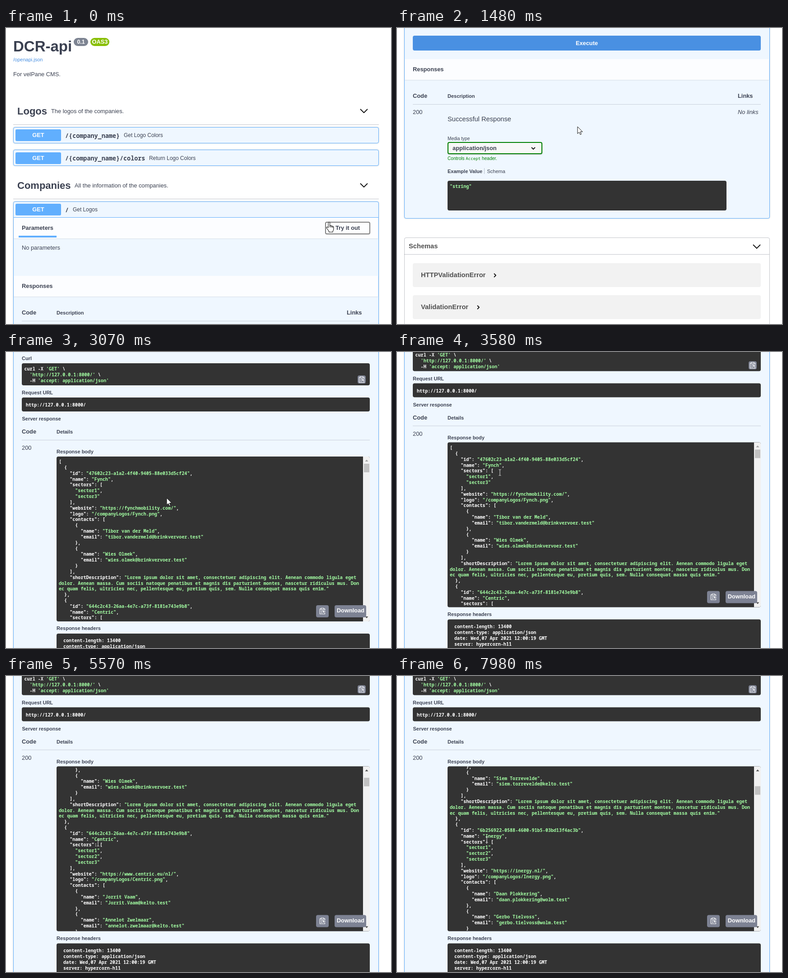
Animation of 853 by 657 pixels, one loop 8000 ms. Source, as an HTML page:

```html
<!DOCTYPE html>
<html lang="en">
<head>
<meta charset="utf-8">
<title>API docs demo</title>
<style>
  html, body { margin: 0; width: 100%; height: 100%; overflow: hidden; background: #fff; }
  #stage { position: relative; width: 853px; height: 657px; overflow: hidden; color: #3b4151;
    font-family: "Liberation Sans", Arial, sans-serif; }
  #stage div, #stage svg { position: absolute; box-sizing: border-box; }
  svg { overflow: visible; }
  .text { white-space: pre; line-height: 20px; margin-top: -10px; }
  .bold { font-weight: 700; }
  .mid { transform: translateX(-50%); }
  .white { color: #fff; }
  .green { color: #008000; }
  .code { white-space: pre-wrap; word-break: break-all; line-height: 12.83px; margin-top: -6.4px;
    width: 110.5ch; color: #fff; font: 700 10.08px/12.83px "Noto Sans Mono", "DejaVu Sans Mono", monospace; }
  .code i { font-style: normal; color: #a2fca2; }
  .mono { font-family: "Noto Sans Mono", "DejaVu Sans Mono", monospace; }
  .block { background: #eff7ff; border: 1px solid #61affe; border-radius: 4px; box-shadow: 0 0 3px rgba(0,0,0,.19); }
  .head { background: rgba(255,255,255,.8); box-shadow: 0 1px 2px rgba(0,0,0,.1); }
  .get { background: #61affe; border-radius: 3px; }
  .rule { background: rgba(59,65,81,.3); }
  .dark { background: #333; border-radius: 4px; overflow: hidden; }
  .btn { border: 2px solid #808080; border-radius: 4px; background: rgba(255,255,255,.35); box-shadow: 0 1px 2px rgba(0,0,0,.1); }
  .exec { background: #4990e2; border-radius: 4px; }
  .grey { background: #7d8293; border-radius: 4px; }
  .panel { background: #f2f2f2; border-radius: 4px; }
</style>
</head>
<body>
<div id="stage"></div>
<script>
const stage = document.getElementById('stage');

function box(parent, x, y, w, h, cls = '', css = '') {
  const el = document.createElement('div');
  el.className = cls;
  el.style.cssText = `left:${x}px;top:${y}px;width:${w}px;height:${h}px;${css}`;
  return parent.appendChild(el);
}
function text(parent, x, y, html, size = 12.83, cls = '', css = '') {
  const el = document.createElement('div');
  el.className = 'text ' + cls;
  el.style.cssText = `left:${x}px;top:${y}px;font-size:${size}px;${css}`;
  el.innerHTML = html;
  return parent.appendChild(el);
}
function code(parent, x, y, html) {
  const el = document.createElement('div');
  el.className = 'code';
  el.style.cssText = `left:${x}px;top:${y}px`;
  el.innerHTML = html;
  return parent.appendChild(el);
}
function path(parent, x, y, d, stroke = '#111', fill = 'none', width = 1.8) {
  parent.insertAdjacentHTML('beforeend',
    `<svg width="1" height="1" style="left:${x}px;top:${y}px"><path d="${d}" fill="${fill}" stroke="${stroke}" stroke-width="${width}" stroke-linejoin="round"/></svg>`);
  return parent.lastElementChild;
}
const layer = (parent, y = 0) => box(parent, 0, y, 853, 0);
const chevron = (parent, x, y) => path(parent, x, y, 'M-8-4L0 4L8-4');
const caret = (parent, x, y) => path(parent, x, y, 'M-2-4L2 0L-2 4');

function clipboard(parent, x, y, w, h) {
  box(parent, x, y, w, h, 'grey');
  path(parent, x + w / 2, y + h / 2,
    'M-3-5H-5.5V6.5H5.5V4M5.5-1V-5H3M-3-6.5H3V-3.5H-3ZM-3-1H3M-3 1.5H0M-3 4H0M7 1.5H1.5M4-.8L1.5 1.5L4 3.8', '#fff', 'none', 1.2);
}
function operation(parent, y, route, labelX, label) {
  box(parent, 21, y + 5, 101, 26, 'get');
  text(parent, 71.5, y + 18, 'GET', 12.83, 'bold white mid');
  text(parent, 131, y + 18.5, route, 13.45, 'mono bold');
  text(parent, labelX, y + 18, label, 11.92);
}
function section(parent, y, label) {
  box(parent, 17, y, 807, 46, 'head');
  text(parent, 35, y + 22.5, label, 12.83, 'bold');
}
function tag(parent, y, name, noteX, note) {
  text(parent, 25, y, name, 22, 'bold');
  text(parent, noteX, y + .5, note);
  chevron(parent, 792.5, y - .5);
  box(parent, 16, y + 29.5, 810, 1, 'rule');
}

// Top of the page
const page = layer(stage);
text(page, 16, 41, 'DCR-api', 33, 'bold');
box(page, 150, 22, 32, 18, '', 'background:#7d8492;border-radius:9px');
text(page, 166, 31, '0.1', 12.4, 'bold white mid');
box(page, 187, 22, 42, 18, '', 'background:#89bf04;border-radius:9px');
text(page, 208, 31, 'OAS3', 12.83, 'bold white mid');
text(page, 16, 69.5, '/openapi.json', 11, '', 'color:#4990e2');
text(page, 16, 102.5, 'For velPane CMS.');
tag(page, 184.5, 'Logos', 100, 'The logos of the companies.');
box(page, 15.5, 220, 810, 36, 'block');
operation(page, 220, '/{company_name}', 261, 'Get Logo Colors');
box(page, 15.5, 270, 810, 36, 'block');
operation(page, 270.5, '/{company_name}/colors', 317, 'Return Logo Colors');
tag(page, 349.5, 'Companies', 152, 'All the information of the companies.');

const openBlock = box(page, 15.5, 384.5, 810, 519, 'block');
operation(page, 385, '/', 148, 'Get Logos');
box(page, 16, 420, 809, 1, '', 'background:#61affe');
section(page, 421, 'Parameters');
box(page, 28, 461, 84, 4, '', 'background:#61affe');
text(page, 35, 488, 'No parameters');
const tryOut = layer(page);
box(tryOut, 706.5, 430, 100, 28, 'btn');
text(tryOut, 757, 444, 'Try it out', 12.83, 'bold mid');
const cancel = layer(page);
box(cancel, 715, 430, 91, 28, 'btn', 'border-color:#ff6060');
text(cancel, 760.5, 444, 'Cancel', 12.83, 'bold mid', 'color:#ff6060');

// Documented responses and schemas
const docs = layer(page);
const execute = layer(docs);
box(execute, 35, 17, 771, 33, 'exec');
text(execute, 420.5, 34, 'Execute', 12.83, 'bold white mid');
section(docs, 69, 'Responses');
text(docs, 35, 151, 'Code', 12.83, 'bold');
text(docs, 112, 151, 'Description', 11, 'bold');
text(docs, 755, 151, 'Links', 12.83, 'bold');
box(docs, 35, 169, 771, 1, 'rule', 'opacity:.7');
text(docs, 35, 187, '200');
text(docs, 755, 187, '<em>No links</em>');
text(docs, 112, 201.5, 'Successful Response', 14.67);
text(docs, 112, 245.5, 'Media type', 10.08);
box(docs, 111.5, 253, 210.5, 27, '', 'background:#f7f7f7;border:2px solid #008000;border-radius:4px;box-shadow:0 1px 2px rgba(0,0,0,.25)');
text(docs, 123, 266.5, 'application/json', 12.83, 'bold');
path(docs, 302, 266.5, 'M-4-2L0 2L4-2');
text(docs, 112, 289.5, 'Controls <span class="mono" style="font-size:9.17px">Accept</span> header.', 10.08, 'green');
text(docs, 112, 317.5, 'Example Value', 11, 'bold');
box(docs, 193, 311, 1, 13, 'rule');
text(docs, 199.5, 317.5, 'Schema', 11);
box(docs, 111.5, 338.5, 618, 66, 'dark');
code(docs, 117, 351, '<i>"string"</i>');
box(docs, 15.5, 465, 810, 200, '', 'border:1px solid rgba(59,65,81,.3);border-radius:4px');
box(docs, 16, 502, 809, 1, 'rule');
text(docs, 26, 484, 'Schemas', 14.67, 'bold', 'color:#505050');
chevron(docs, 797, 484.5);
[['HTTPValidationError', 522, 217], ['ValidationError', 593, 179.5]].forEach(([name, y, x]) => {
  box(docs, 35, y, 771, 53, 'panel');
  text(docs, 53, y + 26, name, 14.67, 'bold', 'color:#505050');
  caret(docs, x, y + 27);
});

// Live response
const live = layer(page, 550);
box(live, 44, 24, 291, 30, 'exec', 'border-radius:4px 0 0 4px');
text(live, 189, 39, 'Execute', 12.83, 'bold white mid');
box(live, 334, 24, 463, 30, 'btn', 'border-radius:0 4px 4px 0');
text(live, 565.5, 39, 'Clear', 12.83, 'bold mid');
section(live, 81.5, 'Responses');
text(live, 35, 160.5, 'Curl', 11, 'bold');
box(live, 35, 172, 771, 49, 'dark');
code(live, 40.5, 184.5, `curl -X <i>'GET'</i> \\
  <i>'http://127.0.0.1:8000/'</i> \\
  -H <i>'accept: application/json'</i>`);
clipboard(live, 779, 198.5, 18, 18.5);
text(live, 35, 237, 'Request URL', 11, 'bold');
box(live, 35, 248, 771, 31, 'dark');
code(live, 44, 264, 'http://127.0.0.1:8000/');
text(live, 35.5, 294.5, 'Server response', 11, 'bold');
text(live, 35, 324, 'Code', 12.83, 'bold');
text(live, 112, 324, 'Details', 11, 'bold');
box(live, 35, 342, 771, 1, 'rule', 'opacity:.7');
text(live, 35, 360, '200');
text(live, 112, 367.5, 'Response body', 11, 'bold');

const lorem = 'Lorem ipsum dolor sit amet, consectetuer adipiscing elit. Aenean commodo ligula eget dolor. ' +
  'Aenean massa. Cum sociis natoque penatibus et magnis dis parturient montes, nascetur ridiculus mus. ' +
  'Donec quam felis, ultricies nec, pellentesque eu, pretium quis, sem. Nulla consequat massa quis enim.';
const company = (id, name, sectors, website, mail, people) => ({
  id, name,
  sectors: sectors.map(n => 'sector' + n),
  website,
  logo: `/companyLogos/${name}.png`,
  contacts: people.map(([name, user]) => ({ name, email: `${user}@${mail}` })),
  shortDescription: lorem
});
const companies = [
  company('47602c23-a1a2-4f40-9405-88e033d5cf24', 'Fynch', [1, 3], 'https://fynchmobility.com/', 'brinkvervoer.test',
    [['Tibor van der Meld', 'tibor.vandermeld'], ['Wies Olmek', 'wies.olmek']]),
  company('644c2c43-26aa-4e7c-a73f-8181e743e9b8', 'Centric', [1, 2, 3], 'https://www.centric.eu/nl/', 'kelto.test',
    [['Jorrit Vaam', 'Jorrit.Vaam'], ['Annelot Zwelmaar', 'annelot.zwelmaar'], ['Siem Torrevelde', 'siem.torrevelde']]),
  company('6b256922-0588-4600-91b5-03bd13f4ac3b', 'Inergy', [1, 2, 3], 'https://inergy.nl/', 'wolm.test',
    [['Daan Plokkering', 'daan.plokkering'], ['Gerbo Tielvoss', 'gerbo.tielvoss']])
];
const json = JSON.stringify(companies, null, 2)
  .replace(/("[^"]*")(:?)/g, (all, str, colon) => colon ? all : `<i>${str}</i>`);

const body = box(live, 111.5, 379, 694.5, 366, 'dark');
const list = box(body, 5.5, 11.5, 680, 0);
code(list, 0, 0, json);
const selection = box(list, 78.65, 32, 0, 13, '', 'background:#0a64d2;overflow:hidden');
code(selection, 0, 6.5, 'Fynch');
box(body, 679.5, 0, 15, 366, '', 'background:#f1f1f1');
const thumb = box(body, 681.5, 15.5, 12, 19, '', 'background:#c1c1c1');
const upArrow = path(body, 687, 8.5, 'M-3.5 2L0-2L3.5 2Z', 'none', '#505050');
path(body, 687, 357, 'M-3.5-2L0 2L3.5-2Z', 'none', '#505050');
clipboard(live, 687, 708.5, 28, 27);
box(live, 728, 708.5, 70, 27, 'grey');
text(live, 763.5, 721, 'Download', 12.83, 'bold white mid');
text(live, 112, 760, 'Response headers', 11, 'bold');
box(live, 111.5, 772, 694.5, 80, 'dark');
code(live, 127, 787.5, `content-length: 13400
content-type: application/json
date: Wed,07 Apr 2021 12:00:19 GMT
server: hypercorn-h11`);

// Pointers, each drawn from its hot spot
const pointers = {
  hand: path(stage, 0, 0, 'M-2 12V1.5a1.8 1.8 0 0 1 3.6 0V8q2.2-1 3 .6q2.2-.8 3 .8q2.2-.2 2.2 2V15q0 3-1.8 5v2H-.5v-2L-5.4 13.5q-1.2-2 .4-2.7Q-3.6 10.3-2 12zM1.6 8v3.5M4.6 9v3M7.6 10v2.5', '#111', '#fff', 1.1),
  arrow: path(stage, 0, 0, 'M0 0V15.5L3.6 12.2L6 17.6L8.4 16.6L6.1 11.3H11Z', '#111', '#fff', 1),
  beam: path(stage, 0, 0, 'M-2.5-6.5H-.8L0-6L.8-6.5H2.5M0-6V6M-2.5 6.5H-.8L0 6L.8 6.5H2.5', '#e8e8e8', 'none', 1)
};

// Timelines: [time, value] with straight lines between
const scrollKeys = [[920, 0], [1400, 550], [2700, 550], [3035, 697], [3290, 728.5]];
const listKeys = [[5120, 0], [5400, 183.3], [6150, 183.3], [6500, 366.6], [7300, 366.6], [7650, 550]];
const selectKeys = [[3860, 0], [4480, 5]];
const xKeys = [[0, 716], [390, 745], [700, 745], [1300, 400], [1590, 400], [1840, 420], [2250, 420], [2650, 356],
  [3080, 356], [3690, 195], [3860, 195], [4480, 228], [4800, 228], [5200, 205], [5540, 204], [5960, 204], [7930, 199]];
const yKeys = [[0, 431], [390, 450], [700, 450], [1300, 219], [1590, 219], [1840, 34], [2250, 34], [2650, 324],
  [3080, 324], [3690, 253], [4800, 253], [5200, 366], [5540, 371], [5960, 371], [7930, 363]];

function at(keys, t) {
  const i = keys.findIndex(k => k[0] > t);
  if (i < 0) return keys[keys.length - 1][1];
  if (i === 0) return keys[0][1];
  const [t0, a] = keys[i - 1], [t1, b] = keys[i];
  return a + (b - a) * (t - t0) / (t1 - t0);
}
const show = (el, on) => { el.style.visibility = on ? 'visible' : 'hidden'; };
const STEP = 132.5;

function render(time) {
  const t = Math.max(0, Math.floor((time - 120) / STEP) * STEP + 120);
  const trying = t >= 640, executed = t >= 1960;

  page.style.transform = `translateY(${-at(scrollKeys, t)}px)`;
  openBlock.style.height = (executed ? 1500 : trying ? 588.5 : 519.5) + 'px';
  docs.style.top = (trying ? 550 : 481) + 'px';
  show(tryOut, !trying);
  show(cancel, trying);
  show(execute, trying && !executed);
  docs.style.display = executed ? 'none' : '';
  live.style.display = executed ? '' : 'none';

  const offset = at(listKeys, t);
  list.style.transform = `translateY(${-offset}px)`;
  thumb.style.transform = `translateY(${offset * .051}px)`;
  upArrow.style.opacity = offset > 0 ? 1 : .5;
  selection.style.width = Math.round(at(selectKeys, t)) * 6.05 + 'px';

  const kind = t < 800 || (t > 1790 && t < 2330) ? 'hand' : t < 3420 ? 'arrow' : 'beam';
  for (const name in pointers) {
    show(pointers[name], name === kind);
    pointers[name].style.transform = `translate(${at(xKeys, t)}px,${at(yKeys, t)}px)`;
  }
}

const start = performance.now();
function frame() {
  render((performance.now() - start) % 8000);
  requestAnimationFrame(frame);
}
frame();
</script>
</body>
</html>
```
